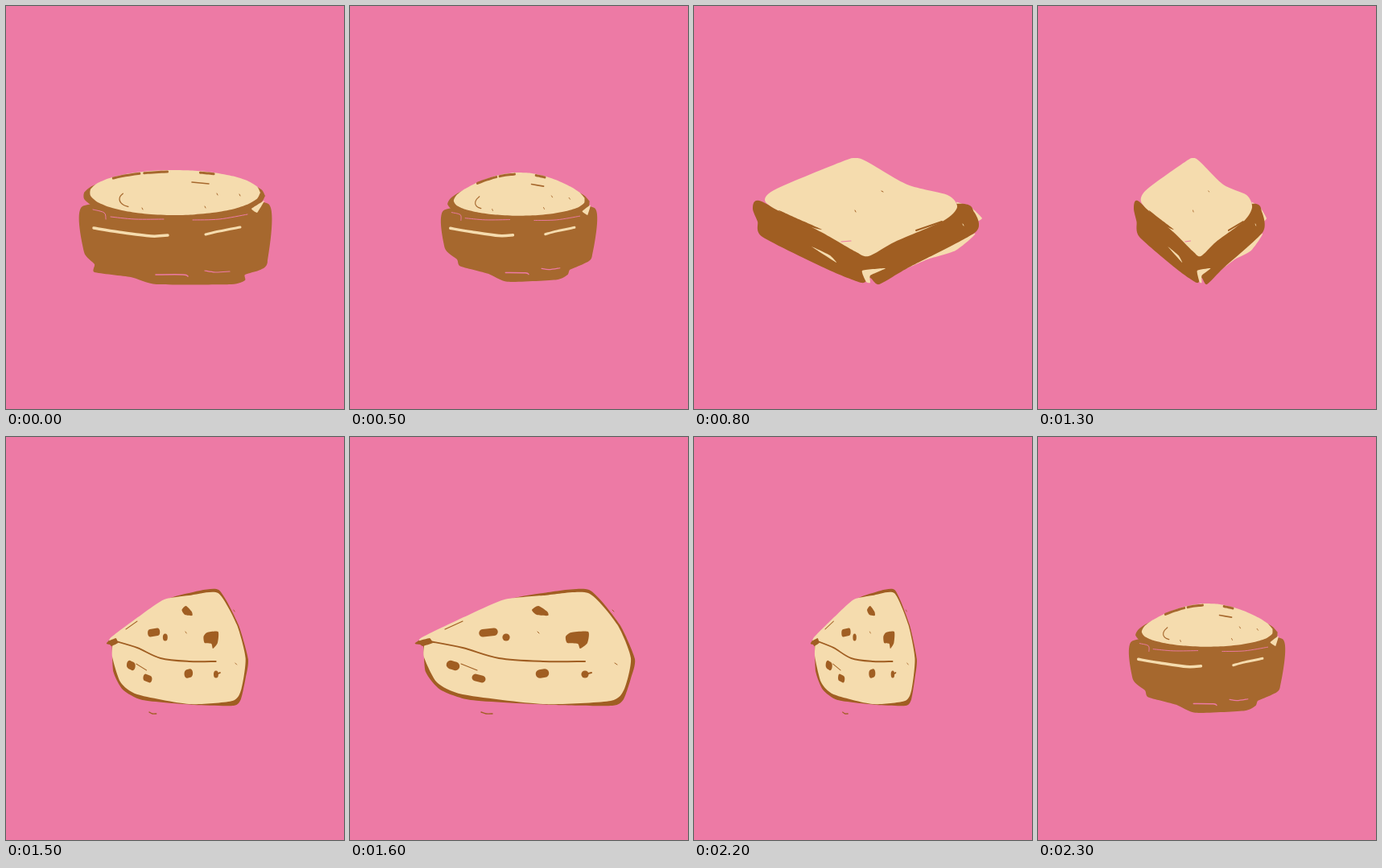
Animation, 420 px wide and 501 px high, one loop 2.4 s. Source, as an HTML page with a canvas:

```html
<!DOCTYPE html>
<html lang="en">
<head>
<meta charset="utf-8">
<title>Bun, bread, cheese</title>
<style>
html, body { margin: 0; width: 100%; height: 100%; overflow: hidden; background: #ed7aa5; }
canvas { display: block; }
</style>
</head>
<body>
<canvas id="stage" width="420" height="501"></canvas>
<script>
const W = 420, H = 501, MID = 278;
const PINK = '#ed7aa5', CREAM = '#f5dcae', BUN = '#a6682e', CRUST = '#a05e22';
const g = document.getElementById('stage').getContext('2d');
g.lineCap = g.lineJoin = 'round';

// Current pose: points are relative to the centre; bulge pulls the far edges in.
let centre = 0, bulge = 0;

function warp(x, y) {
  const u = (x - centre) / 110, v = (y - MID) / 70;
  return [
    (x - centre) * (1 - bulge * v * v),
    MID + (y - MID) * (1 - bulge * (0.17 + 0.5 * u * u))
  ];
}

// Smooth path through the points; k sets the roundness.
function trace(p, closed, k) {
  const n = p.length / 2;
  const at = i => {
    i = closed ? (i + n) % n : Math.max(0, Math.min(n - 1, i));
    return warp(p[2 * i], p[2 * i + 1]);
  };
  g.beginPath();
  g.moveTo(...at(0));
  for (let i = 0; i < (closed ? n : n - 1); i++) {
    const [a, b, c, d] = [at(i - 1), at(i), at(i + 1), at(i + 2)];
    g.bezierCurveTo(
      b[0] + (c[0] - a[0]) * k, b[1] + (c[1] - a[1]) * k,
      c[0] - (d[0] - b[0]) * k, c[1] - (d[1] - b[1]) * k, ...c);
  }
}

function blob(color, p, k = 0.11) {
  trace(p, true, k);
  g.fillStyle = color;
  g.fill();
}

function line(color, width, ...p) {
  trace(p, false, 0.16);
  g.strokeStyle = color;
  g.lineWidth = width;
  g.stroke();
}

function oval(x, y, rx, ry, from = 0, to = 2 * Math.PI, steps = 24) {
  const p = [];
  for (let i = 0; i < steps; i++) {
    const a = from + (to - from) * i / (steps - 1);
    p.push(x + rx * Math.cos(a), y + ry * Math.sin(a));
  }
  return p;
}

const speck = (color, x, y, dx = 1, dy = 2) => line(color, 1, x, y, x + dx, y + dy);

function drawBun() {
  blob(BUN, [95,249, 97,306, 110,321, 110,331, 155,337, 187,346, 280,346, 297,341, 297,334, 316,328, 325,318, 326,246, 210,240], 0.09);
  blob(BUN, oval(209, 236, 113, 28));
  blob(CREAM, oval(210, 232, 106, 28));
  for (const [from, to] of [[-2.38, -2], [-1.94, -1.66], [-1.27, -1.1]])
    line(BUN, 3, ...oval(210, 232, 106, 26, from, to, 5));
  line(BUN, 1.3, ...oval(157, 240, 16, 10, 1.9, 3.9, 6));
  line(BUN, 1.6, 231,219, 252,221);
  for (const [x, y] of [[262, 233], [247, 249], [169, 251], [290, 234]]) speck(BUN, x, y);

  blob(CREAM, [305,252, 321,242, 312,257], 0.05);
  line(CREAM, 3.5, 109,276, 140,281, 180,286, 201,285);
  line(CREAM, 3, 248,284, 265,280, 291,275);
  line(PINK, 1, 108,253, 122,257, 124,265);
  line(PINK, 1, 130,262, 160,265, 196,265);
  line(PINK, 1, 232,266, 265,265, 300,259);
  line(PINK, 1.5, 186,334, 220,334, 226,336);
  line(PINK, 1.2, 247,329, 260,331, 278,330);
}

function drawBread() {
  blob(CREAM, [326,244, 345,251, 358,264, 345,270], 0.06);
  blob(CREAM, [255,330, 348,283, 325,304, 290,315]);
  blob(CRUST, [73,252, 81,242, 150,268, 326,246, 348,256, 350,281, 265,326, 230,346, 219,338, 208,344, 165,327, 85,287, 79,268]);
  blob(CREAM, [209,329, 238,326, 219,335, 219,344, 214,343], 0.07);
  blob(CREAM, [146,299, 169,310, 177,319], 0.06);
  blob(CREAM, [88,241, 103,227, 185,193, 200,189, 214,193, 265,222, 315,235, 327,250, 310,267, 250,293, 217,311, 200,305, 158,281, 102,253], 0.13);
  blob(CRUST, [105,254, 130,265, 159,278, 125,269]);
  line(CRUST, 2, 276,279, 308,268);
  line(PINK, 1.2, 183,293, 195,292);
  speck(CRUST, 200, 254);
  speck(CRUST, 233, 230, 2, 1);
  speck(CREAM, 334, 271);
}

function drawCheese() {
  blob(CRUST, [84,254, 192,204, 240,194, 297,190, 335,233, 354,276, 349,300, 340,326, 326,334, 250,333, 150,327, 112,314, 94,292, 91,260], 0.1);
  blob(CREAM, [88,250, 150,220, 192,202, 240,197, 296,194, 332,233, 349,275, 341,313, 324,328, 240,332, 140,320, 108,305, 92,274, 92,258]);
  blob(CRUST, [84,254, 99,250, 103,256, 90,260], 0.04);
  line(CRUST, 2, 99,254, 140,262, 185,275, 240,279, 292,279);
  line(CRUST, 1.2, 118,239, 140,229);
  line(CRUST, 1.1, 138,282, 158,290);
  blob(CRUST, [226,215, 234,210, 245,217, 246,222, 232,221]);
  blob(CRUST, [268,248, 275,243, 296,242, 295,256, 286,263, 283,257, 270,256]);

  // Holes: x, y, half length, slope, thickness
  const holes = [[172, 243, 7, -0.1, 9.5], [194, 249, 0.1, 0, 9], [128, 284, 3, 0.3, 10.5],
    [160, 300, 4, 0.25, 9], [239, 294, 3, -0.15, 10.5], [292, 295, 0.1, 0, 9]];
  for (const [x, y, r, slope, size] of holes)
    line(CRUST, size, x - r, y - r * slope, x + r, y + r * slope);

  line(CRUST, 2, 292,295, 300,293);
  line(CRUST, 1.4, 163,342, 169,344, 177,344);
  speck(CRUST, 233, 242, 2, 2);
  speck(CRUST, 329, 281, 3, 2);
  speck(CRUST, 326, 215, 2, 2);
}

// turn: width while turning; bulge: how barrel-like it gets
const foods = [
  { draw: drawBun, centre: 212, turn: 0.85, bulge: 0.235 },
  { draw: drawBread, centre: 182.3, turn: 0.579, bulge: 0 },
  { draw: drawCheese, centre: 204.8, turn: 0.644, bulge: 0 }
];
const HOLD = 500, STEP = 100, SLOT = HOLD + 3 * STEP;

function show(food, width) {
  centre = food.centre;
  bulge = width < 1 ? food.bulge : 0;
  g.setTransform(1, 0, 0, 1, 0, 0);
  g.fillStyle = PINK;
  g.fillRect(0, 0, W, H);
  g.setTransform(width, 0, 0, 1, centre, 0);
  food.draw();
}

function tick() {
  const t = performance.now() % (SLOT * foods.length);
  const i = Math.floor(t / SLOT);
  const food = foods[i], next = foods[(i + 1) % foods.length];
  const step = Math.floor((t % SLOT - HOLD) / STEP);
  if (step < 0) show(food, 1);
  else if (step === 0) show(food, food.turn);
  else if (step === 1) show(food, food.turn * 0.75);
  else show(next, next.turn);
  requestAnimationFrame(tick);
}
tick();
</script>
</body>
</html>
```
